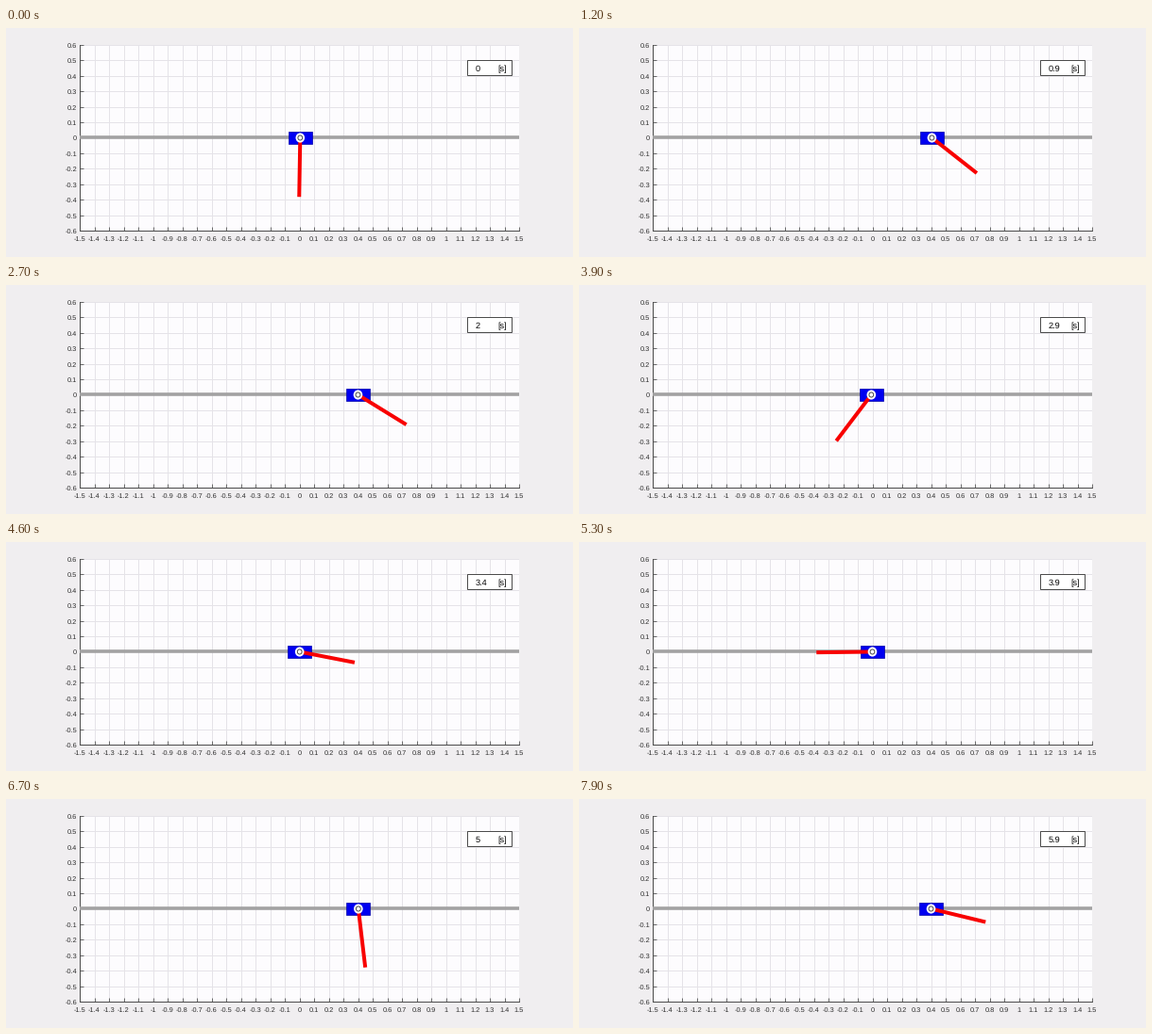
A matplotlib script that plays this animation: 600x243 px, repeating every 8000 ms.

```python
import numpy as np
import matplotlib.pyplot as plt
from matplotlib.animation import FuncAnimation
from matplotlib.patches import Ellipse, Rectangle

W, H, DPI = 600, 243, 100
FRAMES, INTERVAL = 80, 100
DT = 0.0743                      # simulated seconds per frame
PX = 72 / DPI                    # one pixel in points
LEFT, RIGHT, TOP, BOTTOM = 78, 543, 18, 215
DARK = "#2b2b2b"
LINE = "#4c4c4c"
ROD = 0.382

# Cart setpoint changes: (start time, displacement)
STEPS = [(-0.025, 0.4), (2.0, -0.4), (4.0, 0.4)]
SIGMA, OMEGA = 4.2, 5.24         # decay and frequency of the cart's response

# Turning points of the rod: (frame, degrees from hanging, right is positive)
SWINGS = [(-0.4, 0), (3.6, -42), (10.5, 65), (18.3, -67), (26.2, 62.5),
          (35.7, -98), (44.5, 94), (52.8, -89.6), (62.5, 108),
          (71.8, -104.5), (81, 100)]


def to_px(x, y):
    return (LEFT + (x + 1.5) / 3 * (RIGHT - LEFT),
            TOP + (0.6 - y) / 1.2 * (BOTTOM - TOP))


def cart_x(t):
    x = 0
    for start, size in STEPS:
        s = t - start
        if s > 0:
            ring = np.cos(OMEGA * s) + SIGMA / OMEGA * np.sin(OMEGA * s)
            x += size * (1 - np.exp(-SIGMA * s) * ring)
    return x


def rod_angle(k):
    for (k0, a0), (k1, a1) in zip(SWINGS, SWINGS[1:]):
        if k <= k1:
            ease = (1 - np.cos(np.pi * (k - k0) / (k1 - k0))) / 2
            return np.radians(a0 + (a1 - a0) * ease)


plt.rcParams["font.family"] = "Liberation Sans"
plt.rcParams["text.hinting"] = "none"
plt.rcParams["text.kerning_factor"] = 6
fig = plt.figure(figsize=(W / DPI, H / DPI), dpi=DPI, facecolor="#f0eef0")

ax = fig.add_axes([LEFT / W, 1 - BOTTOM / H,
                   (RIGHT - LEFT) / W, (BOTTOM - TOP) / H])
ax.set(xlim=(-1.5, 1.5), ylim=(-0.6, 0.6), facecolor="#fdfcfe")
xticks = np.arange(-15, 16) / 10
yticks = np.arange(-6, 7) / 10
ax.set_xticks(xticks, [])
ax.set_yticks(yticks, [])
ax.grid(color="#e5e3e8", lw=PX)
ax.set_axisbelow(True)
ax.tick_params(direction="in", length=4 * PX, width=0.8 * PX, color=LINE)
for side, spine in ax.spines.items():
    spine.set(visible=side in ("left", "bottom"), color=LINE, linewidth=PX)

# Overlay in pixel coordinates for labels and the clock
page = fig.add_axes([0, 0, 1, 1])
page.set(xlim=(0, W), ylim=(H, 0))
page.axis("off")


def label(x, y, text, size, ha="left", color=DARK):
    return page.text(x, y, text, size=size * PX, ha=ha, va="baseline",
                     color=color)


for x in xticks:
    label(to_px(x, 0)[0], 225.8, f"{x:g}", 7.4, "center")
for y in yticks:
    label(75, to_px(0, y)[1] + 2.9, f"{y:g}", 7.4, "right")

page.add_patch(Rectangle((488, 34), 47, 16, fc="white", ec=LINE, lw=PX))
clock = label(496.6, 46.3, "0", 9.1, color="black")
label(520, 46.3, "[s]", 9.1, color="black")

ax.plot([-1.5, 1.5], [0, 0], color="#a2a2a2", lw=3.6 * PX, zorder=3,
        solid_capstyle="butt")
CART_W, CART_H = 0.162, 0.082
cart = Rectangle((0, -CART_H / 2), CART_W, CART_H, fc="#0000f0",
                 ec="#0000a8", lw=0.7 * PX, zorder=4)
ax.add_patch(cart)
rod, = ax.plot([], [], color="#f80000", lw=4 * PX, zorder=5,
               solid_capstyle="butt")
hub = Ellipse((0, 0), 0.062, 0.062, fc="white", ec="none", zorder=6)
pin = Ellipse((0, 0), 0.031, 0.031, fc="white", ec="#3c3c3c", lw=0.9 * PX,
              zorder=7)
ax.add_patch(hub)
ax.add_patch(pin)


def update(k):
    t = k * DT
    x, a = cart_x(t), rod_angle(k)
    cart.set_x(x - CART_W / 2)
    rod.set_data([x, x + ROD * np.sin(a)], [0, -ROD * np.cos(a)])
    hub.center = pin.center = (x, 0)
    clock.set_text(f"{round(t, 1):g}")
    return cart, rod, hub, pin, clock


anim = FuncAnimation(fig, update, frames=FRAMES, interval=INTERVAL,
                     repeat=True, repeat_delay=0)
plt.show()
```
